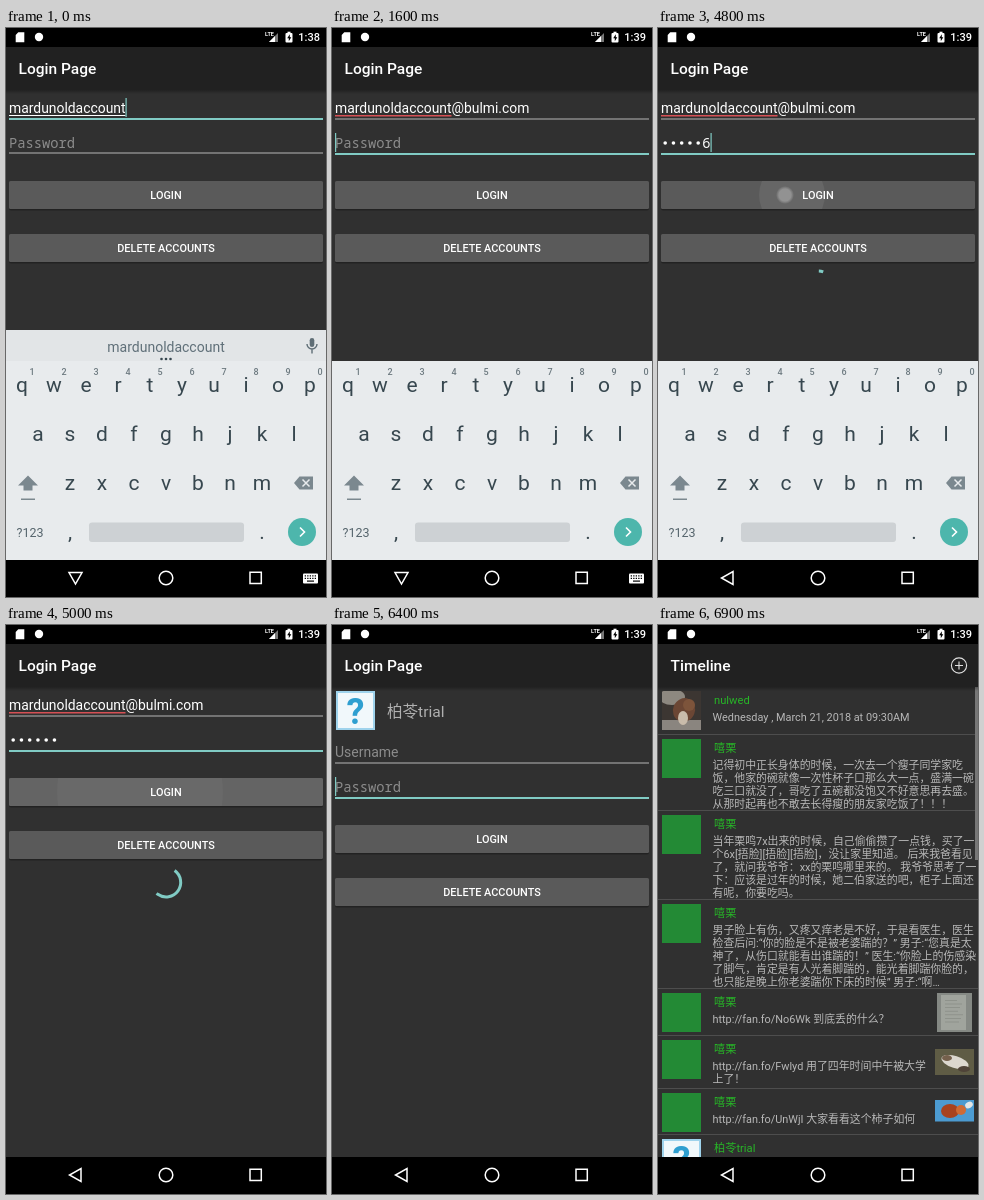
An HTML page with a canvas that plays this animation: 320 px wide and 569 px high, repeating every 8000 ms.

```html
<!DOCTYPE html>
<html lang="en">
<head>
<meta charset="utf-8">
<title>Login demo</title>
<style>
html, body { margin: 0; width: 100%; height: 100%; overflow: hidden; background: #000; }
canvas { display: block; width: 320px; height: 569px; }
</style>
</head>
<body>
<canvas id="stage"></canvas>
<script>
const W = 320, H = 569, LOOP = 8000, STEP = 100;
const TEAL = '#80cbc4', INK = '#37474f', BG = '#303030', KEYS = '#e8ebed';
const SANS = 'Roboto, "Noto Sans CJK SC", "Noto Sans CJK", sans-serif';
const MONO = '"Noto Sans Mono", monospace', MONO_SIZE = 13.75, ADVANCE = 8.25;
const USER = 'mardunoldaccount', DOMAIN = 'bulmi', FRIEND = '柏苓trial', FEED = '嘻栗';
const TYPED = [0, 1, 1, 2, 3, 4, 4, 5, 6, 6, 7, 8, 9, 10];

const canvas = document.getElementById('stage');
const ctx = canvas.getContext('2d');
const ratio = window.devicePixelRatio || 1;
canvas.width = W * ratio;
canvas.height = H * ratio;
ctx.scale(ratio, ratio);

function rect(x, y, w, h, color, r = 0) {
  ctx.fillStyle = color;
  ctx.beginPath();
  ctx.roundRect(x, y, w, h, r);
  ctx.fill();
}
function circle(x, y, r, color) {
  ctx.fillStyle = color;
  ctx.beginPath();
  ctx.arc(x, y, r, 0, 7);
  ctx.fill();
}
function oval(x, y, rx, ry, color, turn = 0) {
  ctx.fillStyle = color;
  ctx.beginPath();
  ctx.ellipse(x, y, rx, ry, turn, 0, 7);
  ctx.fill();
}
function shape(d, fill, stroke, width = 1.5) {
  const path = new Path2D(d);
  if (fill) { ctx.fillStyle = fill; ctx.fill(path); }
  if (stroke) { ctx.strokeStyle = stroke; ctx.lineWidth = width; ctx.stroke(path); }
}
function text(s, x, y, size, color, { weight = 400, align = 'left', family = SANS } = {}) {
  ctx.font = `${weight} ${size}px ${family}`;
  ctx.textAlign = align;
  ctx.fillStyle = color;
  ctx.fillText(s, x, y);
  return ctx.measureText(s).width;
}
function clipped(x, y, w, h, draw) {
  ctx.save();
  ctx.beginPath();
  ctx.rect(x, y, w, h);
  ctx.clip();
  draw();
  ctx.restore();
}

function statusBar(clock) {
  rect(0, 0, W, 19, '#000');
  shape('M12.3 4.2h6v10h-8.6v-7.2z', '#fff');
  circle(33, 9, 4.2, '#fff');
  text('LTE', 259, 8, 5.5, '#fff', { weight: 700 });
  shape('M272 5v9h-9z', '#777');
  shape('M269 8v6h-6z', '#fff');
  rect(279.5, 5, 7, 9.5, '#fff', 1);
  rect(281.5, 3.7, 3, 2, '#fff');
  shape('M283.8 6.2l-2.6 4h1.6v3l2.5-4h-1.5z', '#000');
  text(clock, 314, 13.2, 11, '#fff', { weight: 500, align: 'right' });
}
function navBar(keyboard) {
  rect(0, 532, W, 37, '#000');
  shape(keyboard ? 'M63 544.5h13l-6.5 11.5z' : 'M75 543.5v13l-11.5-6.5z', null, '#fff');
  ctx.beginPath();
  ctx.arc(160, 550, 6.8, 0, 7);
  ctx.stroke();
  shape('M244 544.3h11.3v11.3h-11.3z', null, '#fff');
  if (!keyboard) return;
  rect(297, 545.5, 15, 10, '#fff', 1);
  for (let i = 0; i < 10; i++) rect(298.7 + i % 5 * 2.5, 547.3 + (i > 4) * 2.5, 1.3, 1.3, '#000');
  rect(301, 552.5, 7, 1.2, '#000');
}
function actionBar(title) {
  const shadow = ctx.createLinearGradient(0, 62, 0, 66);
  shadow.addColorStop(0, 'rgba(0,0,0,.3)');
  shadow.addColorStop(1, 'rgba(0,0,0,0)');
  rect(0, 62, W, 4, shadow);
  rect(0, 19, W, 43, '#212121');
  text(title, 12.5, 46, 15.5, '#fff', { weight: 500 });
}

function suggestions(t, typed) {
  rect(0, 302, W, 31, '#e2e5e7');
  const label = (s, x, weight = 400) =>
    text(s, x, 324, 14, weight > 400 ? '#455a64' : '#607079', { weight, align: 'center' });
  if (t < 100) label(USER, 160);
  else if (typed > 1 && t < 1400) {
    label(typed > 3 ? DOMAIN : DOMAIN.slice(0, typed - 1), 160, 700);
    if (typed > 3) {
      label('email', 70);
      label('e-mail', 250);
    }
    rect(112, 308, 1, 21, '#cdd3d6');
    rect(207, 308, 1, 21, '#cdd3d6');
  }
  for (let i = 0; i < 3; i++) circle(155.5 + i * 4.5, 331, 1.3, INK);
  rect(303.7, 310, 4.6, 9, '#5f6e76', 2.3);
  shape('M301 316a5 5 0 0 0 10 0M306 321.5v4', null, '#5f6e76', 1.4);
}
function keyboard() {
  rect(0, 333, W, 199, KEYS);
  const row = (keys, x, y) => [...keys].forEach((k, i) =>
    text(k, x + i * 32, y, 21, INK, { align: 'center' }));
  row('qwertyuiop', 16, 364);
  row('asdfghjkl', 32, 413);
  row('zxcvbnm', 64, 462);
  [...'1234567890'].forEach((k, i) =>
    text(k, 26 + i * 32, 347, 9, '#6d7a80', { weight: 500, align: 'center' }));
  shape('M22 447.5l10 10h-5.5v5h-9v-5h-5.5z', '#7b888f');
  rect(15, 470.5, 14, 1.5, '#7b888f');
  shape('M288 455l5.5-6.5h13.5v13h-13.5z', '#7b888f');
  shape('M296.5 451.5l7 7m0-7l-7 7', null, KEYS);
  text('?123', 24, 508.5, 12.5, '#55646c', { align: 'center' });
  text(',', 64, 511, 21, INK, { align: 'center' });
  text('.', 256, 511, 21, INK, { align: 'center' });
  rect(83, 494.5, 155, 19.5, '#cdd1d4', 3);
  circle(296, 504, 14, '#4db6ac');
  shape('M294 499.5l4.5 4.5l-4.5 4.5', null, '#fff', 1.6);
}

function field(y, focused) {
  if (focused) rect(3, y - .9, 314, 1.8, TEAL);
  else rect(3, y - .5, 314, 1, '#b5b5b5');
}
function cursor(x, y) {
  rect(x, y, 1.2, 19, TEAL);
}
function button(label, y) {
  rect(3, y + 1, 314, 28.5, 'rgba(0,0,0,.3)', 2);
  rect(3, y, 314, 28, '#5a5a5a', 1.5);
  return () => text(label, 160, y + 18, 10.9, '#fff', { weight: 500, align: 'center' });
}
function ripple(t) {
  if (t < 4700 || t > 5300) return;
  clipped(3, 153, 314, 28, () => {
    const fade = Math.max(0, (5400 - t) / 400);
    if (t >= 4900) rect(3, 153, 314, 28, `rgba(255,255,255,${.06 * Math.min(1, fade)})`);
    circle(134, 167, 8 + (t - 4700) / 4, `rgba(255,255,255,${t < 4900 ? .07 : .03 * fade})`);
  });
  if (t < 4900) {
    const touch = ctx.createRadialGradient(127, 167, 6, 127, 167, 9);
    touch.addColorStop(0, '#929292');
    touch.addColorStop(1, 'rgba(146,146,146,0)');
    circle(127, 167, 9, touch);
  }
}
function spinner(t) {
  const age = t - 4785, ease = x => 1 - (1 - Math.min(1, Math.max(0, x))) ** 3;
  if (age < 0 || t >= 5700) return;
  const angle = share => (age * .165 + 270 * share - 90) * Math.PI / 180;
  ctx.strokeStyle = TEAL;
  ctx.lineWidth = 3;
  ctx.beginPath();
  ctx.arc(160.2, 257.4, 14.5, angle(ease(age / 667 - 1)), angle(ease(age / 667)));
  ctx.stroke();
}
function username(t, typed, y) {
  if (t >= 5600) {
    text('Username', 3, y + 85, 14, '#8c8c8c');
    return;
  }
  const value = USER + `@${DOMAIN}.com`.slice(0, typed);
  const width = text(value, 3, y + 85, 13.9, '#fff');
  const upTo = n => 3 + ctx.measureText(value.slice(0, n)).width;
  const underline = (from, to, color, h) => rect(upTo(from), 87, upTo(to) - upTo(from), h, color);
  const n = USER.length;
  if (t < 100) underline(0, n, '#fff', 1);
  else underline(0, n, '#d65055', 1.5);
  if (typed > 1 && t < 1000) underline(n + 1, value.length, '#fff', 1);
  if (typed > 7 && t < 1400) underline(n + 7, value.length, '#fff', 1);
  if (t < 1400) cursor(3 + width, 70);
}
function password(t, y) {
  const count = t >= 5600 ? 0 : [2400, 2600, 2700, 3000, 3200, 3400].filter(at => t >= at).length;
  if (!count) text('Password', 3, y + 120, MONO_SIZE, '#8c8c8c', { family: MONO });
  const shown = t < 4900 ? count - 1 : count;
  for (let i = 0; i < shown; i++) circle(7.2 + i * ADVANCE, y + 115, 1.8, '#fff');
  if (count && shown < count) text(count, 3 + shown * ADVANCE, y + 120, MONO_SIZE, '#fff', { family: MONO });
  const off = [[0, 1400], [2100, 2400], [3900, 4400], [4900, 5400], [5800, 6400]];
  if (!off.some(([a, b]) => t >= a && t < b)) cursor(3 + count * ADVANCE, y + 105);
}
function questionAvatar(x, y) {
  rect(x, y, 39, 39, '#9fd3ec');
  rect(x + 2, y + 2, 35, 35, '#f1f8fb');
  text('?', x + 19.5, y + 33, 36, '#2f9fd0', { weight: 700, align: 'center' });
}
function login(t) {
  const typed = t < 1400 ? TYPED[t / STEP] : 10;
  const y = t >= 5700 ? 47 : 0;
  rect(0, 19, W, 513, BG);
  actionBar('Login Page');
  if (y) {
    if (t >= 6400) questionAvatar(4, 66);
    text(FRIEND, 55, 91.5, 15.56, '#b0b0b0');
  }
  field(y + 91, t < 1400);
  username(t, typed, y);
  field(y + 126 - (t < 1400), t >= 1400);
  password(t, y);
  const loginLabel = button('LOGIN', y + 153);
  ripple(t);
  loginLabel();
  button('DELETE ACCOUNTS', y + 206)();
  spinner(t);
  if (t >= 5000) return;
  ctx.save();
  if (t >= 4900) {
    ctx.globalAlpha = .4;
    ctx.translate(0, 12);
  }
  if (t < 1500) suggestions(t, typed);
  keyboard();
  ctx.restore();
}

function squirrel(x, y) {
  clipped(x, y, 39, 39, () => {
    rect(x, y, 39, 39, '#3c3632');
    rect(x, y + 29, 39, 10, '#8a857f');
    oval(x + 10, y + 6, 13, 8, '#8d8880');
    oval(x + 22, y + 19, 11, 12, '#6b4634', .4);
    oval(x + 21, y + 27, 5, 7, '#c9bcab');
    circle(x + 27, y + 14, 6, '#7d543b');
  });
}
function sheetPhoto() {
  rect(279, 368, 35, 39, '#858984');
  rect(283, 370, 25, 35, '#a0a49d');
  for (let i = 0; i < 7; i++) rect(287, 375 + i * 3.6, 12 + i * 5 % 7, .8, '#8a8e87');
}
function catPhoto() {
  clipped(277, 424, 39, 26, () => {
    rect(277, 424, 39, 26, '#5f5c45');
    oval(297, 437, 14, 6, '#dcd8cf', .3);
    oval(289, 433, 5, 3, '#75604c');
    oval(306, 444, 6, 3, '#4f4338');
  });
}
function fruitPhoto() {
  rect(277, 475, 39, 21.5, '#4c9bd1');
  oval(292, 486, 9, 7, '#a8431f');
  oval(303, 485, 5, 5, '#cf6b35');
  oval(311, 480, 4, 3, '#e4e6e6', -.5);
}
const posts = [
  [66, 'nulwed', ['Wednesday , March 21, 2018 at 09:30AM']],
  [114, FEED, ['记得初中正长身体的时候，一次去一个瘦子同学家吃',
    '饭，他家的碗就像一次性杯子口那么大一点，盛满一碗',
    '吃三口就没了，哥吃了五碗都没饱又不好意思再去盛。',
    '从那时起再也不敢去长得瘦的朋友家吃饭了！！！']],
  [190, FEED, ['当年栗鸣7x出来的时候，自己偷偷攒了一点钱，买了一',
    '个6x[捂脸][捂脸][捂脸]，没让家里知道。 后来我爸看见',
    '了，就问我爷爷：xx的栗鸣哪里来的。 我爷爷思考了一',
    '下：应该是过年的时候，她二伯家送的吧，柜子上面还',
    '有呢，你要吃吗。']],
  [279, FEED, ['男子脸上有伤，又疼又痒老是不好，于是看医生，医生',
    '检查后问:“你的脸是不是被老婆踹的？” 男子:“您真是太',
    '神了，从伤口就能看出谁踹的！” 医生:“你脸上的伤感染',
    '了脚气，肯定是有人光着脚踹的，能光着脚踹你脸的，',
    '也只能是晚上你老婆踹你下床的时候” 男子:“啊…']],
  [368, FEED, ['http://fan.fo/No6Wk 到底丢的什么？'], sheetPhoto],
  [415, FEED, ['http://fan.fo/Fwlyd 用了四年时间中午被大学', '上了！'], catPhoto],
  [468, FEED, ['http://fan.fo/UnWjI 大家看看这个柿子如何'], fruitPhoto],
  [514, FRIEND, []],
];
function timeline() {
  rect(0, 19, W, 513, BG);
  posts.forEach(([y, name, lines, photo], i) => {
    if (i) rect(0, y - 5, W, 1, '#4d4d4d');
    if (name === FEED) rect(4, y, 39, 39, '#238a35');
    else if (name === FRIEND) questionAvatar(4, y);
    else squirrel(4, y);
    text(name, 56, y + 13.3, 11.2, '#27b527');
    lines.forEach((line, n) => text(line, 54.5, y + 29.5 + n * 13.1, 10.9, '#b8b8b8'));
    if (photo) photo();
  });
  rect(317, 62, 3, 173, '#777');
  actionBar('Timeline');
  ctx.strokeStyle = '#e0e0e0';
  ctx.lineWidth = 1.1;
  ctx.beginPath();
  ctx.arc(301, 40.5, 7.6, 0, 7);
  ctx.stroke();
  shape('M301 36.5v8m-4-4h8', null, '#e0e0e0', 1.1);
}

function draw(now) {
  const t = Math.floor(now % LOOP / STEP) * STEP;
  if (t < 6900) login(t);
  if (t >= 6600) clipped(0, 19, W, 513, () => {
    const p = Math.min(1, (t - 6500) / 400);
    ctx.globalAlpha = Math.min(1, p * 1.5);
    ctx.translate(0, 45 * (1 - p) ** 2);
    timeline();
  });
  statusBar(t < 1600 ? '1:38' : '1:39');
  navBar(t < 4800);
}
const start = performance.now();
function tick() {
  draw(performance.now() - start);
  requestAnimationFrame(tick);
}
tick();
</script>
</body>
</html>
```
